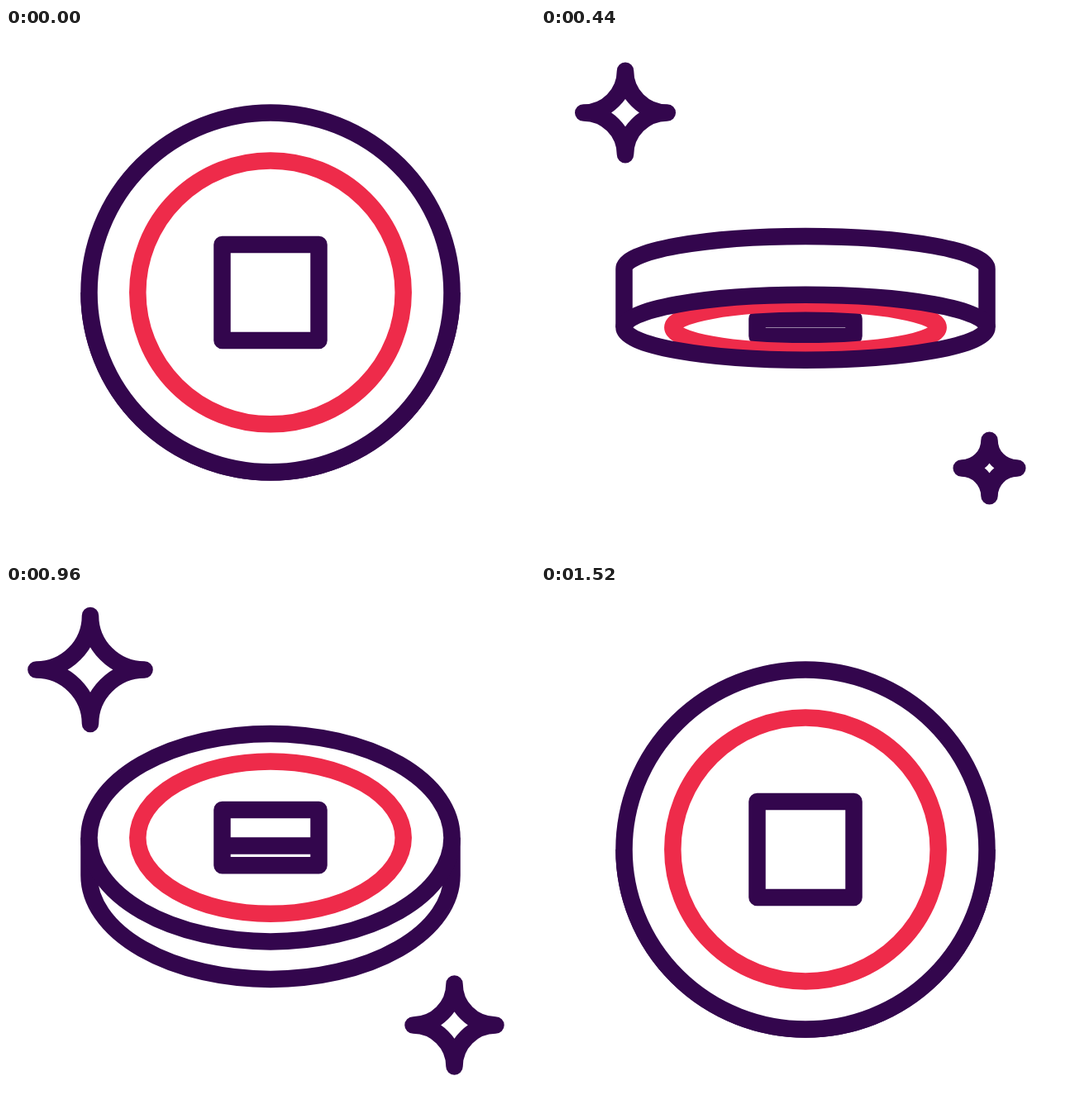
Recreate the animation shown at these times as an HTML page with a canvas. Size 640 by 640 pixels, loop 1.9 s.

```html
<!DOCTYPE html>
<html lang="en">
<head>
<meta charset="utf-8">
<title>Flipping coin</title>
<style>
  html, body { margin: 0; width: 100%; height: 100%; overflow: hidden; background: #fff; }
  canvas { display: block; width: 100vw; height: 100vh; }
</style>
</head>
<body>
<canvas id="stage" width="640" height="640"></canvas>
<script>
const ctx = document.getElementById('stage').getContext('2d');
const LOOP = 1900, INK = '#33064d', RED = '#ee2b4a', CX = 320, CY = 320;
const FLIP = 776, RETURN = 692, DROP = 9.6;
const STAR_DELAY = 260;

// star radius over time: pop in, settle, swell, vanish
const STAR = [[45, 0], [318, 68], [460, 50], [710, 50], [1040, 68], [1258, 0]];

const clamp = (v, lo, hi) => Math.max(lo, Math.min(hi, v));

function starRadius(t) {
  const i = STAR.findIndex(([time]) => time > t);
  if (i < 1) return 0;
  const [t0, r0] = STAR[i - 1], [t1, r1] = STAR[i];
  return r0 + (r1 - r0) * (1 - Math.cos(Math.PI * (t - t0) / (t1 - t0))) / 2;
}

// Quarter turns made: two half turns, each starting a little fast
function quarterTurns(t) {
  const s = t < FLIP ? t / FLIP : Math.min(2, 1 + (t - FLIP) / RETURN);
  return 2 * s + .028 * Math.sin(2 * Math.PI * s);
}

function stroke(color, draw) {
  ctx.strokeStyle = color;
  ctx.beginPath();
  draw();
  ctx.stroke();
}

function drawCoin(t) {
  const turn = quarterTurns(t), q = turn % 2;
  const dir = q < 1 ? 1 : -1;
  const tilt = q < 1 ? q : 2 - q;
  const open = Math.max(0, 1 - tilt ** 1.5);
  const depth = 81 * tilt * dir;
  const mid = CY + DROP * Math.max(0, Math.sin(turn * Math.PI / 4)) ** 1.3;
  const front = mid - depth / 2, back = mid + depth / 2;
  const ry = 217.5 * open, half = 58 * open;

  // rim
  stroke(INK, () => {
    ctx.moveTo(CX - 219.5, front);
    ctx.lineTo(CX - 219.5, back);
    ctx.ellipse(CX, back, 219.5, ry, 0, Math.PI, 0, dir > 0);
    ctx.lineTo(CX + 219.5, front);
  });
  ctx.beginPath();
  ctx.ellipse(CX, front, 219.5, ry, 0, 0, 7);
  ctx.fill();

  // hole; its far edge slides away from where it lies when the coin is flat
  const flatY = CY + (turn > 1 && turn < 3 ? DROP : 0);
  const far = clamp(flatY + dir * (90 * tilt ** 1.25 - 58), front - half, front + half);
  stroke(INK, () => {
    ctx.rect(CX - 58.5, front - half, 117, 2 * half);
    ctx.moveTo(CX - 58.5, far);
    ctx.lineTo(CX + 58.5, far);
  });

  stroke(RED, () => ctx.ellipse(CX, front, 160.7, 159.5 * open, 0, 0, 7));
  stroke(INK, () => ctx.ellipse(CX, front, 219.5, ry, 0, 0, 7));
}

function drawStar(x, y, t) {
  const r = starRadius(t);
  if (r <= 0) return;
  stroke(INK, () => {
    for (let i = 0; i < 4; i++) {
      const corner = (i - .5) * Math.PI / 2, start = Math.PI * (1 + i / 2);
      ctx.arc(x + r * Math.SQRT2 * Math.cos(corner), y + r * Math.SQRT2 * Math.sin(corner),
        r, start, start - Math.PI / 2, true);
    }
    ctx.closePath();
  });
}

function frame() {
  const t = performance.now() % LOOP;
  ctx.fillStyle = '#fff';
  ctx.fillRect(0, 0, 640, 640);
  ctx.lineWidth = 20.5;
  ctx.lineJoin = 'round';
  drawCoin(t);
  drawStar(102, 102.5, t);
  drawStar(542.5, 532.5, t - STAR_DELAY);
  requestAnimationFrame(frame);
}
frame();
</script>
</body>
</html>
```
